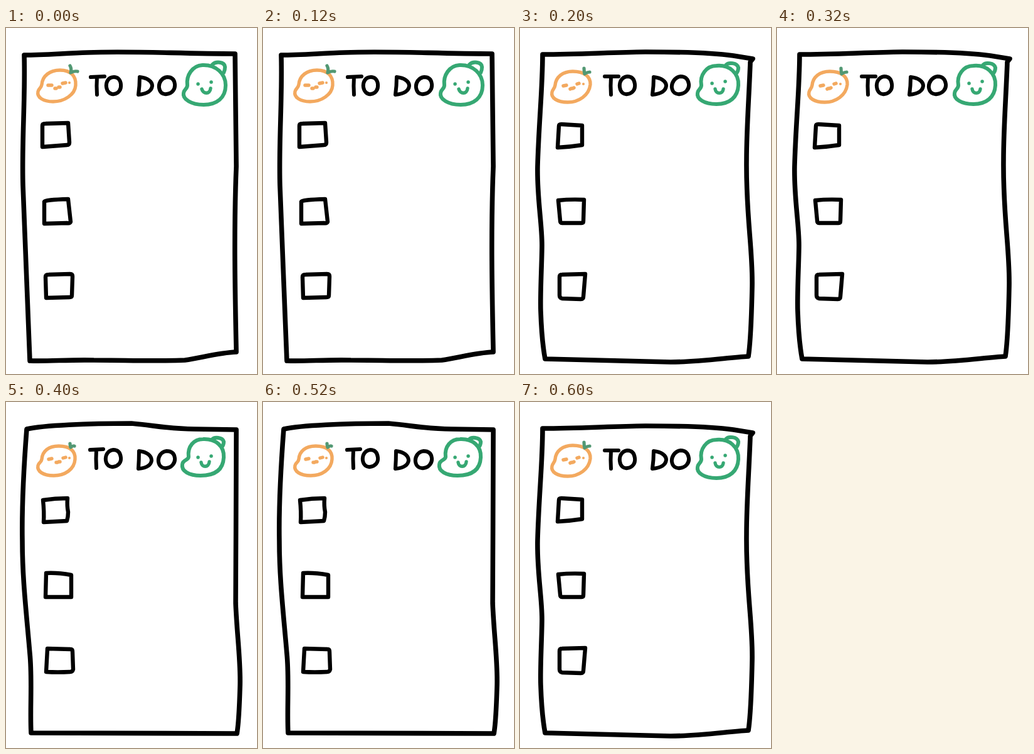
An HTML page that plays this animation: 400x550 px, repeating every 0.8 s.

```html
<!DOCTYPE html>
<html lang="en">
<head>
<meta charset="utf-8">
<title>To do list</title>
<style>
  html, body { margin: 0; width: 100%; height: 100%; overflow: hidden; background: #fff; }
  svg { display: block; width: 400px; height: 550px; }
  path { fill: none; stroke-linecap: round; stroke-linejoin: round; }
  .edge { stroke: #000; stroke-width: 7.6; }
  .box { stroke: #000; stroke-width: 6.4; }
  .word { stroke: #000; stroke-width: 6; }
  .fruit { stroke: #f3a95f; stroke-width: 5.4; }
  .leaf { stroke: #529873; stroke-width: 5.2; }
  .pal { stroke: #36a873; stroke-width: 6; }
  .dot, .smile { stroke-width: 5.4; }
  .speck { stroke-width: 4; }

  /* Three wobbling drawings, shown as a, b, c, b */
  .pose { visibility: hidden; animation: 800ms step-end infinite; }
  #a { animation-name: first; }
  #b { animation-name: between; }
  #c { animation-name: third; }
  @keyframes first { 0% { visibility: visible; } 25%, 100% { visibility: hidden; } }
  @keyframes between {
    0%, 50%, 100% { visibility: hidden; }
    25%, 75% { visibility: visible; }
  }
  @keyframes third { 0%, 75%, 100% { visibility: hidden; } 50% { visibility: visible; } }
</style>
</head>
<body>
<svg viewBox="0 0 400 550" role="img" aria-label="TO DO">
  <g id="a" class="pose">
    <path class="edge" d="M29 43C60 43 95 40 130 39C200 36 275 41 365 41C366 100 366 160 367 220C363 320 365 420 367 515C340 516 312 524 285 528C240 530 190 528 140 528C100 527 70 530 38 529C35 440 30 340 27 250C25 180 31 110 29 43Z"/>
    <path class="box" d="M58 155Q58 152 63 152L99 151L101 182Q101 186 97 186L58 189Z"/>
    <path class="box" d="M61 276Q62 273 99 272L103 308Q102 311 97 310L61 311Z"/>
    <path class="box" d="M63 396Q63 392 68 392L102 391Q106 391 106 395L105 425Q105 428 101 428L64 429Z"/>
    <path class="word" d="M135 78L157 77M145 78Q144 92 145 106"/>
    <path class="word" d="M172 78C163 78 159 86 160 94C161 101 166 106 172 105C180 104 184 97 183 89C182 82 178 78 172 78Z"/>
    <path class="word" d="M213 78Q213 92 211 106M213 78C225 79 233 85 233 92C232 101 222 105 211 106"/>
    <path class="word" d="M257 78C248 79 243 87 244 95C245 102 249 106 256 105C265 104 270 97 269 89C268 81 263 78 257 78Z"/>
    <path class="fruit" d="M57 90C58 76 70 67 86 67C103 67 112 76 111 91C110 106 93 117 75 117C59 117 49 110 51 101C52 96 56 96 57 90Z"/>
    <path class="fruit" d="M67 91L73 91M90 88L95 87M78 96L80 96M84 94L86 94"/>
    <path class="fruit speck" d="M101 87h.1"/>
    <path class="leaf" d="M102 60Q105 65 103 71Q108 68 114 69"/>
    <path class="pal" d="M289 91C287 75 297 60 313 59C335 58 350 73 350 91C350 111 336 122 315 122C295 122 281 113 283 103C284 97 289 97 289 91Z"/>
    <path class="pal" d="M329 58C334 53 348 53 349 62Q349 67 347 71"/>
    <path class="pal dot" d="M306 89h.1M327 86h.1"/>
    <path class="pal smile" d="M312 97C314 105 325 106 326 96"/>
  </g>

  <g id="b" class="pose">
    <path class="edge" d="M36 42C90 42 140 39 200 38C260 38 310 40 340 44L371 49L367 54C365 110 361 160 361 210C360 300 371 350 370 410C369 460 368 495 364 522C330 524 285 531 240 531C170 529 100 527 40 526C37 510 34 480 33 450C32 420 35 370 35 345C35 310 27 270 28 220C30 150 36 95 36 42Z"/>
    <path class="box" d="M62 156Q62 153 66 153L99 155L99 186Q80 189 60 190Z"/>
    <path class="box" d="M61 274Q80 272 102 273L101 307Q101 310 98 310L67 310Q64 310 64 306Z"/>
    <path class="box" d="M63 396Q63 392 67 392L104 391L101 427Q101 431 97 431L67 430Q63 429 63 425Z"/>
    <path class="word" d="M135 77L157 77M145 78Q144 92 145 106"/>
    <path class="word" d="M171 77C162 78 158 86 159 94C160 102 165 106 171 105C180 104 184 97 183 89C182 81 178 77 171 77Z"/>
    <path class="word" d="M213 78Q213 92 211 106M213 78C225 79 233 85 233 92C232 101 222 105 211 106"/>
    <path class="word" d="M256 77C247 78 241 87 242 95C243 102 248 106 255 105C264 104 270 97 269 89C268 81 263 77 256 77Z"/>
    <path class="fruit" d="M56 91C57 78 68 69 84 69C102 69 113 77 112 90C110 107 94 118 76 118C59 118 49 111 51 102C52 97 55 97 56 91Z"/>
    <path class="fruit" d="M69 92L74 91M91 89L94 88M80 97L82 96M84 96L86 95"/>
    <path class="fruit speck" d="M101 89h.1"/>
    <path class="leaf" d="M102 64Q102 68 103 73Q107 70 111 70"/>
    <path class="pal" d="M289 91C286 75 297 60 313 60C334 58 349 72 348 91C347 110 334 121 313 121C294 121 281 113 283 103C284 97 289 97 289 91Z"/>
    <path class="pal" d="M328 59C332 54 346 55 348 63Q348 68 345 72"/>
    <path class="pal dot" d="M306 88h.1M327 85h.1"/>
    <path class="pal smile" d="M311 97C312 105 323 106 324 97"/>
  </g>

  <g id="c" class="pose">
    <path class="edge" d="M33 43C60 37 130 34 200 34C235 37 260 43 300 43L367 44C366 130 367 230 366 320C368 370 374 410 373 450C372 485 371 510 368 527C260 526 150 526 40 526C38 490 42 440 38 400C32 330 26 280 26 220C25 160 29 95 33 43Z"/>
    <path class="box" d="M59 156Q78 153 98 153Q97 165 99 175Q99 183 97 189L60 191Q61 175 59 156Z"/>
    <path class="box" d="M64 272Q82 271 104 275L104 310L63 310Z"/>
    <path class="box" d="M66 392L103 393Q106 393 106 397L107 425Q106 429 102 429Q82 430 64 429Z"/>
    <path class="word" d="M134 76L155 75M144 76Q143 90 144 105"/>
    <path class="word" d="M171 76C162 77 158 85 159 93C160 100 165 104 171 103C179 102 184 96 183 88C182 80 178 76 171 76Z"/>
    <path class="word" d="M212 78Q212 92 211 106M212 78C224 79 232 85 232 93C231 101 222 105 211 106"/>
    <path class="word" d="M256 78C247 79 242 87 243 95C244 102 249 106 256 105C264 104 270 97 269 89C268 81 263 78 256 78Z"/>
    <path class="fruit" d="M57 91C58 78 68 70 84 70C102 70 111 78 110 91C109 107 94 117 76 117C59 117 49 110 51 101C52 96 56 97 57 91Z"/>
    <path class="fruit" d="M68 91L73 90M91 89L95 88M80 96L82 96M84 95L86 95"/>
    <path class="fruit speck" d="M101 89h.1"/>
    <path class="leaf" d="M102 66Q102 69 103 72Q107 69 109 70"/>
    <path class="pal" d="M291 87C289 71 299 59 314 59C334 58 348 70 347 88C346 108 333 117 310 117C292 117 279 110 281 99C282 91 291 93 291 87Z"/>
    <path class="pal" d="M328 60C332 55 345 56 347 63Q347 68 344 72"/>
    <path class="pal dot" d="M306 88h.1M327 86h.1"/>
    <path class="pal smile" d="M311 96C312 104 323 105 324 95"/>
  </g>
</svg>
</body>
</html>
```
